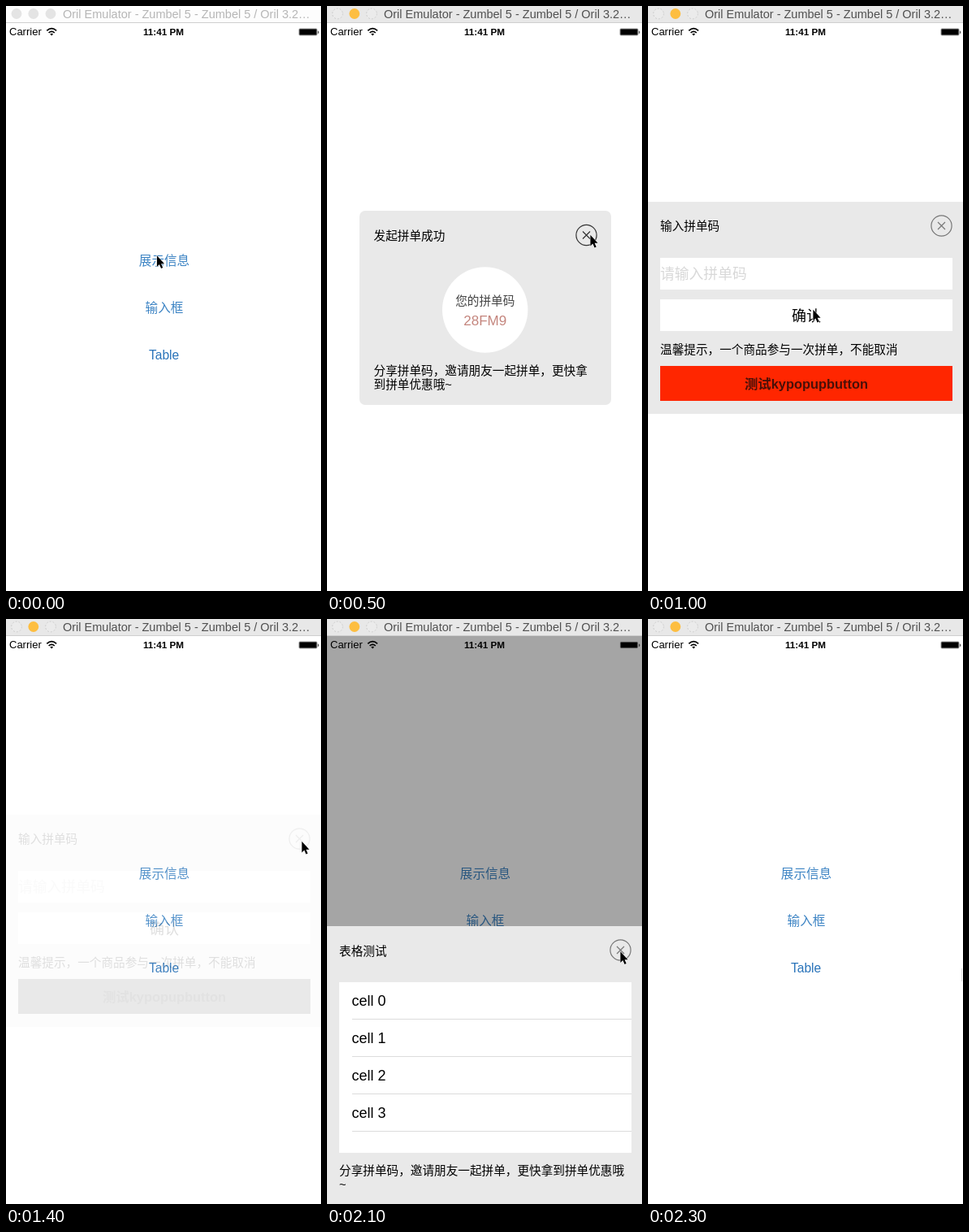
Animation of 388 by 720 pixels, one loop 2400 ms. Source, as an HTML page:

```html
<!DOCTYPE html>
<html lang="zh">
<head>
<meta charset="utf-8">
<style>
  html, body { margin: 0; width: 100%; height: 100%; overflow: hidden; background: #fff; }
  svg { display: block; width: 388px; height: 720px; }
  text { font: 14.63px "Liberation Sans", "Noto Sans CJK SC", "Noto Sans CJK", sans-serif; white-space: pre; }
  .mid { text-anchor: middle; }
  .link { font-size: 15.6px; fill: #2a74ba; }
  .panel { fill: #e9e9e9; }
  .white { fill: #fff; }
  .cjk, .cjk text { font-family: "Liberation Sans", "Noto Sans CJK SC Light", "Noto Sans CJK SC DemiLight", "Noto Sans CJK SC", "Noto Sans CJK", sans-serif; font-weight: 300; }
  .link.cjk { fill: #3d84c4; }
  .close { fill: none; stroke-width: 1.2; }
</style>
</head>
<body>
<svg viewBox="0 0 388 720">
  <rect width="388" height="720" fill="#fff"/>

  <g class="mid">
    <text id="link0" class="link cjk" x="195" y="319">展示信息</text>
    <text id="link1" class="link cjk" x="195" y="377">输入框</text>
    <text id="link2" class="link" x="194.6" y="435">Table</text>
  </g>

  <rect id="mask" y="21" width="388" height="699"/>

  <g id="status">
    <text x="4" y="36" style="font-size:13px">Carrier</text>
    <g fill="none" stroke="#000" stroke-width="1.7">
      <path d="M50.3 30.4Q56.2 25 62.1 30.4M52.6 33Q56.2 29.6 59.8 33"/>
      <path d="M56.2 36.6l-1.9-2.2q1.9-1.5 3.8 0z" fill="#000" stroke="none"/>
    </g>
    <text class="mid" x="194" y="36" style="font-size:11.7px;font-weight:bold">11:41 PM</text>
    <rect x="361" y="28" width="22" height="8" rx="1" stroke="#999"/>
    <path d="M384.3 30.2q2 2 0 4.2z"/>
  </g>

  <g id="popup0">
    <rect class="panel" x="40" y="252" width="310" height="239" rx="7"/>
    <circle class="white" cx="194.7" cy="374" r="52.7"/>
    <g class="cjk">
      <text x="57.5" y="287.5">发起拼单成功</text>
      <text class="mid" x="194.7" y="367.5" fill="#444">您的拼单码</text>
      <text x="57.5" y="453.5">分享拼单码，邀请朋友一起拼单，更快拿</text>
      <text x="57.5" y="471">到拼单优惠哦~</text>
    </g>
    <text class="mid" x="194.7" y="393" fill="#c4857d" style="font-size:17px">28FM9</text>
    <path class="close" stroke="#333" transform="translate(319.5 282)"/>
  </g>

  <g id="popup1">
    <rect class="panel" y="241" width="388" height="261"/>
    <path class="white" d="M15 310h360v39h-360zM15 361h360v39h-360z"/>
    <rect x="15" y="443" width="360" height="43" fill="#ff2600"/>
    <g class="cjk">
      <text x="15" y="276">输入拼单码</text>
      <text x="15" y="336" fill="#d8d8d8" style="font-size:17.8px">请输入拼单码</text>
      <text class="mid" x="195" y="387.5" style="font-size:18px">确认</text>
      <text x="15" y="427.5">温馨提示，一个商品参与一次拼单，不能取消</text>
    </g>
    <text class="mid" x="195" y="470.5" fill="#4a1008" style="font-size:16.4px;font-weight:bold">测试kypopupbutton</text>
    <path class="close" stroke="#777" transform="translate(361.5 270.5)"/>
  </g>

  <g id="popup2">
    <rect class="panel" y="378" width="388" height="342"/>
    <rect class="white" x="15" y="447" width="360" height="210"/>
    <g id="cells"></g>
    <g class="cjk">
      <text x="15" y="413.5">表格测试</text>
      <text x="15" y="684">分享拼单码，邀请朋友一起拼单，更快拿到拼单优惠哦</text>
      <text x="15" y="701">~</text>
    </g>
    <path class="close" stroke="#777" transform="translate(361.5 407.5)"/>
  </g>

  <rect id="bar" width="388" height="20"/>
  <rect y="20" width="388" height="1" fill="#cfcfcf"/>
  <g id="lights">
    <circle cx="13" cy="9.5" r="6.4"/>
    <circle cx="33.8" cy="9.5" r="6.4"/>
    <circle cx="55" cy="9.5" r="6.4"/>
  </g>
  <text id="title" x="70" y="15" style="font-size:14.5px">Oril Emulator - Zumbel 5 - Zumbel 5 / Oril 3.2…</text>

  <rect id="edge" x="386" y="430" width="1" height="16" fill="#ddd"/>
  <path id="cursor" d="M.4 .8V14.4L3.4 11.6 5.6 16.5 7.7 15.6 5.6 10.8H9.6Z" stroke="#fff" stroke-width="1" paint-order="stroke"/>
</svg>
<script>
const el = id => document.getElementById(id);
const set = (node, attrs) => { for (const k in attrs) node.setAttribute(k, attrs[k]); };
const STEP = 100, STEPS = 24;

// step, x, y of the pointer tip
const path = [
  [0, 185.5, 306.5], [2, 185.5, 306.5], [4, 310, 284], [5, 324, 281], [6, 285, 312],
  [7, 201, 371], [9, 202, 373], [10, 203, 373], [12, 345, 284], [13, 364, 273],
  [14, 364, 273], [16, 208, 426], [17, 201.5, 429.5], [18, 201.5, 429.5],
  [20, 346, 411], [21, 361, 408.5], [22, 370, 417], [23, 400, 430]
];
// opacity of the two fading popups, by step
const fades = [
  { 2: .5, 3: 1, 4: 1, 5: 1, 6: .3 },
  { 8: .5, 9: 1, 10: 1, 11: 1, 12: 1, 13: .7, 14: .12 }
];
// share of the bottom sheet that is visible, by step
const sheet = { 18: .4, 19: .95, 20: 1, 21: 1, 22: .35 };
const pressed = [1, 7, 17];

document.querySelectorAll('.close').forEach(p =>
  p.setAttribute('d', 'M-12.6 0a12.6 12.6 0 1 0 25.2 0a12.6 12.6 0 1 0-25.2 0M-4.5-4.5l9 9m0-9l-9 9'));

for (let i = 0; i < 4; i++) {
  const y = 476 + 46 * i;
  el('cells').innerHTML += `<text x="30.5" y="${y}" style="font-size:18px">cell ${i}</text>
    <rect x="31" y="${y + 16}" width="344" height="1" fill="#dcdcdc"/>`;
}

function pointer(step) {
  const i = Math.max(1, path.findIndex(p => p[0] >= step));
  const [s0, x0, y0] = path[i - 1], [s1, x1, y1] = path[i];
  const u = (step - s0) / (s1 - s0);
  return [x0 + (x1 - x0) * u, y0 + (y1 - y0) * u];
}

function draw(step) {
  const active = step > 0;
  set(el('bar'), { fill: active ? '#e8e8e8' : '#fdfdfd' });
  set(el('title'), { fill: active ? '#505050' : '#b6b6b6' });
  [...el('lights').children].forEach((c, i) => {
    const ring = active && i !== 1;
    set(c, {
      fill: !active ? '#e4e4e4' : ring ? '#ebebeb' : '#fdbe41',
      stroke: ring ? '#cdcdcd' : 'none',
      'stroke-dasharray': '2 2'
    });
  });

  pressed.forEach((s, i) => set(el('link' + i), { opacity: s === step ? .16 : 1 }));
  // Translucent popups lose their colour
  fades.forEach((fade, i) => {
    const o = fade[step] || 0;
    set(el('popup' + i), { opacity: o, style: o < .2 ? 'filter:grayscale(1)' : '' });
  });

  const shown = sheet[step] || 0;
  set(el('mask'), { opacity: .353 * shown });
  set(el('popup2'), { transform: `translate(0 ${342 * (1 - shown)})`, opacity: shown ? 1 : 0 });
  set(el('cursor'), { transform: `translate(${pointer(step)})` });
  set(el('edge'), { opacity: step === 23 ? 1 : 0 });
}

const start = performance.now();
function tick() {
  draw(Math.floor((performance.now() - start) / STEP) % STEPS);
  requestAnimationFrame(tick);
}
tick();
</script>
</body>
</html>
```
